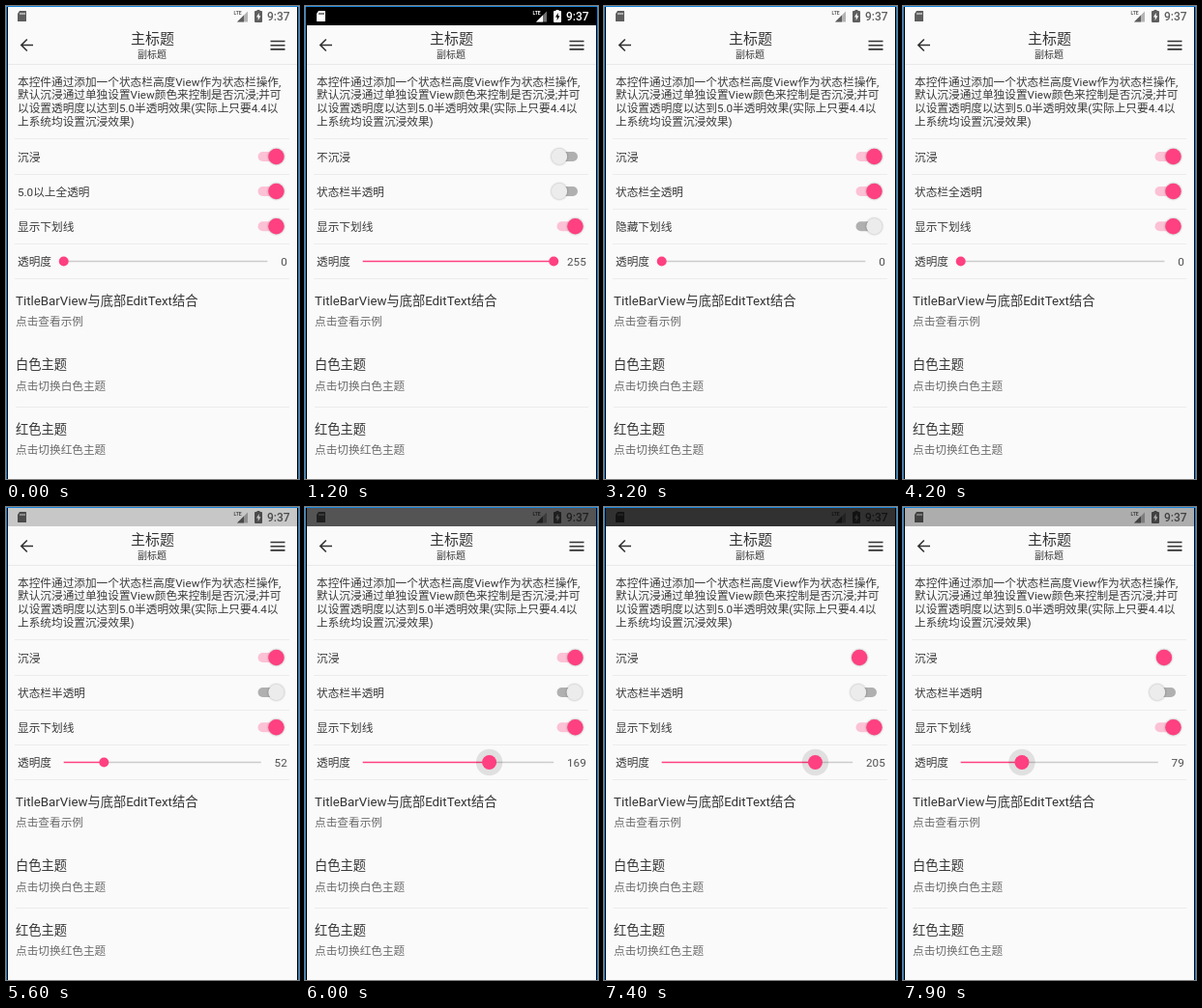
These frames come from a looping animation (303x490 px, 8000 ms). An HTML page:

```html
<!DOCTYPE html>
<html lang="zh-CN">
<head>
<meta charset="utf-8">
<style>
html, body { margin: 0; width: 100%; height: 100%; overflow: hidden; background: #fafafa; }
svg { display: block; width: 100%; height: 100%; }
text { font: 11.67px Roboto, "Noto Sans CJK SC", "Noto Sans CJK", "Noto Sans CJK JP", sans-serif; fill: #3a3a3a; }
.title { font-size: 15px; fill: #333; text-anchor: middle; }
.subtitle { font-size: 10px; text-anchor: middle; }
.item { font-size: 13.27px; fill: #333; }
.hint { fill: #6c6c6c; }
.value { fill: #505050; text-anchor: end; }
.clock { font-size: 12px; font-weight: 500; fill: inherit; text-anchor: end; }
.lte { font-size: 5px; font-weight: 700; fill: inherit; }
.icon { fill: none; stroke: #333; stroke-width: 1.6; }
.shadow { filter: drop-shadow(0 .7px .8px rgba(0, 0, 0, .35)); }
</style>
</head>
<body>
<svg viewBox="0 0 303 490" preserveAspectRatio="none">
  <rect width="303" height="490" fill="#fafafa"/>
  <rect id="statusBar" x="1" y="1" width="301" height="19"/>
  <g id="statusIcons">
    <path d="M14 5h6.5q.5 0 .5.5v10q0 .5-.5.5h-8q-.5 0-.5-.5V8zM14.5 7v2h1V7zm2 0v2h1V7zm2 0v2h1V7z" fill-rule="evenodd"/>
    <text class="lte" x="235.5" y="9">LTE</text>
    <path d="M250 5.5V16.5H239z" opacity=".45"/>
    <path d="M246 9.5V16.5H239z"/>
    <path d="M259.5 5v-1h3v1h1.500q1 0 1 1v10q0 1-1 1h-6q-1 0-1-1V6q0-1 1-1zM261.700 7l-2.700 4.500h1.700V15l2.700-4.700h-1.700z" fill-rule="evenodd"/>
    <text class="clock" x="293.700" y="15.200">9:37</text>
  </g>

  <path class="icon" d="M28 40.500H16M21.800 34.500l-6 6 6 6"/>
  <path class="icon" d="M273.500 36.500h15M273.500 40.700h15M273.500 44.900h15"/>
  <text class="title" x="151.500" y="38.700">主标题</text>
  <text class="subtitle" x="151" y="54">副标题</text>
  <path d="M2 60.500h299" stroke="#e9e9e9"/>

  <text x="12" y="82.500">本控件通过添加一个状态栏高度View作为状态栏操作,</text>
  <text x="12" y="96.200">默认沉浸通过单独设置View颜色来控制是否沉浸;并可</text>
  <text x="12" y="109.900">以设置透明度以达到5.0半透明效果(实际上只要4.4以</text>
  <text x="12" y="123.600">上系统均设置沉浸效果)</text>
  <path d="M9 137.500h284M9 174.500h284M9 210.500h284M9 246.500h284M9 282.500h284M10 415.500h283" stroke="#ececec"/>

  <g id="switches"></g>

  <text x="12" y="269">透明度</text>
  <path id="trackRest" stroke="#cbcbcb" stroke-width="1.600"/>
  <path id="trackFilled" stroke="#ff4081" stroke-width="1.700"/>
  <circle id="halo" cy="264.500" r="13.700" fill="#000" opacity=".1"/>
  <circle id="thumb" cy="264.500" fill="#ff4081"/>
  <text id="value" class="value" x="290.700" y="269"></text>

  <text class="item" x="10" y="309.500">TitleBarView与底部EditText结合</text>
  <text class="hint" x="10" y="331.300">点击查看示例</text>
  <text class="item" x="10" y="376">白色主题</text>
  <text class="hint" x="10" y="397.700">点击切换白色主题</text>
  <text class="item" x="10" y="442.500">红色主题</text>
  <text class="hint" x="10" y="464.200">点击切换红色主题</text>

  <!-- emulator window edge -->
  <path d="M1.500 1V490M301.500 1V490" stroke="#000"/>
  <path d="M.5 490V.5H302.500V490" fill="none" stroke="#1883d7"/>
</svg>
<script>
const LOOP = 8000, STEP = 100;
const $ = id => document.getElementById(id);
const set = (el, attrs) => { for (const k in attrs) el.setAttribute(k, attrs[k]); };

// Linear interpolation through [time, value] pairs.
function along(keys, t) {
  const next = keys.findIndex(k => k[0] > t);
  if (next < 0) return keys[keys.length - 1][1];
  if (next === 0) return keys[0][1];
  const [t0, v0] = keys[next - 1], [t1, v1] = keys[next];
  return v0 + (v1 - v0) * (t - t0) / (t1 - t0);
}

// Every switch starts on and flips at each toggle time; its knob follows later.
const switches = [
  { y: 156, toggles: [900, 2100, 6500, 7300], label: on => on ? '沉浸' : '不沉浸',
    knob: [[900, 1], [1200, 0], [2100, 0], [2300, 1], [6500, 1], [6900, 0], [7300, 0], [7900, .42]],
    trackHidden: t => t >= 7300 },
  { y: 192, toggles: [900, 2100, 5600],
    label: (on, t) => t < 900 ? '5.0以上全透明' : on ? '状态栏全透明' : '状态栏半透明',
    knob: [[900, 1], [1200, 0], [2100, 0], [2300, 1], [5600, 1], [6400, .9], [6700, 0]] },
  { y: 228.3, toggles: [3200, 4000], label: on => on ? '显示下划线' : '隐藏下划线',
    knob: [[3200, 1], [3400, 0], [4000, 0], [4200, 1]] },
];
const alphaKeys = [[899, 0], [900, 255], [2099, 255], [2100, 0], [5599, 0], [5600, 52],
  [6000, 169], [6300, 250], [6500, 255], [7200, 255], [7900, 79]];

for (const s of switches) {
  const group = document.createElementNS('http://www.w3.org/2000/svg', 'g');
  group.innerHTML = `<text x="12" y="${s.y + 4.5}"></text>
    <rect x="260.5" y="${s.y - 5}" width="21.5" height="10" rx="5"/>
    <circle class="shadow" cy="${s.y}" r="8.2"/>`;
  $('switches').append(group);
  [s.text, s.track, s.dot] = group.children;
}

function drawSwitch(s, t) {
  const on = s.toggles.filter(at => at <= t).length % 2 === 0;
  s.text.textContent = s.label(on, t);
  set(s.track, { fill: on ? '#fcc1d5' : '#b0b0b0', opacity: s.trackHidden?.(t) ? 0 : 1 });
  set(s.dot, { cx: 263 + 16.5 * along(s.knob, t), fill: on ? '#ff4081' : '#ececec' });
  return on;
}

function draw(t) {
  const [immersed] = switches.map(s => drawSwitch(s, t));
  const alpha = Math.round(along(alphaKeys, t));
  const shade = immersed ? Math.round(250 * (1 - alpha / 255)) : 0;
  set($('statusBar'), { fill: `rgb(${shade},${shade},${shade})` });
  set($('statusIcons'), { fill: immersed ? '#000' : '#fff', opacity: immersed ? .62 : 1 });

  // The slider shrinks as its number gains digits.
  const left = 59.7, right = 277 - 6.6 * String(alpha).length;
  const x = left + (right - left) * alpha / 255;
  const pressed = t >= 5700;
  set($('trackRest'), { d: `M${x} 264.5H${right}` });
  set($('trackFilled'), { d: `M${left} 264.5H${x}` });
  set($('halo'), { cx: x, visibility: pressed ? 'visible' : 'hidden' });
  set($('thumb'), { cx: x, r: pressed ? 7.5 : 5 });
  $('value').textContent = alpha;
}

const start = performance.now();
function tick() {
  const t = (performance.now() - start) % LOOP;
  draw(Math.floor(t / STEP) * STEP);
  requestAnimationFrame(tick);
}
tick();
</script>
</body>
</html>
```
